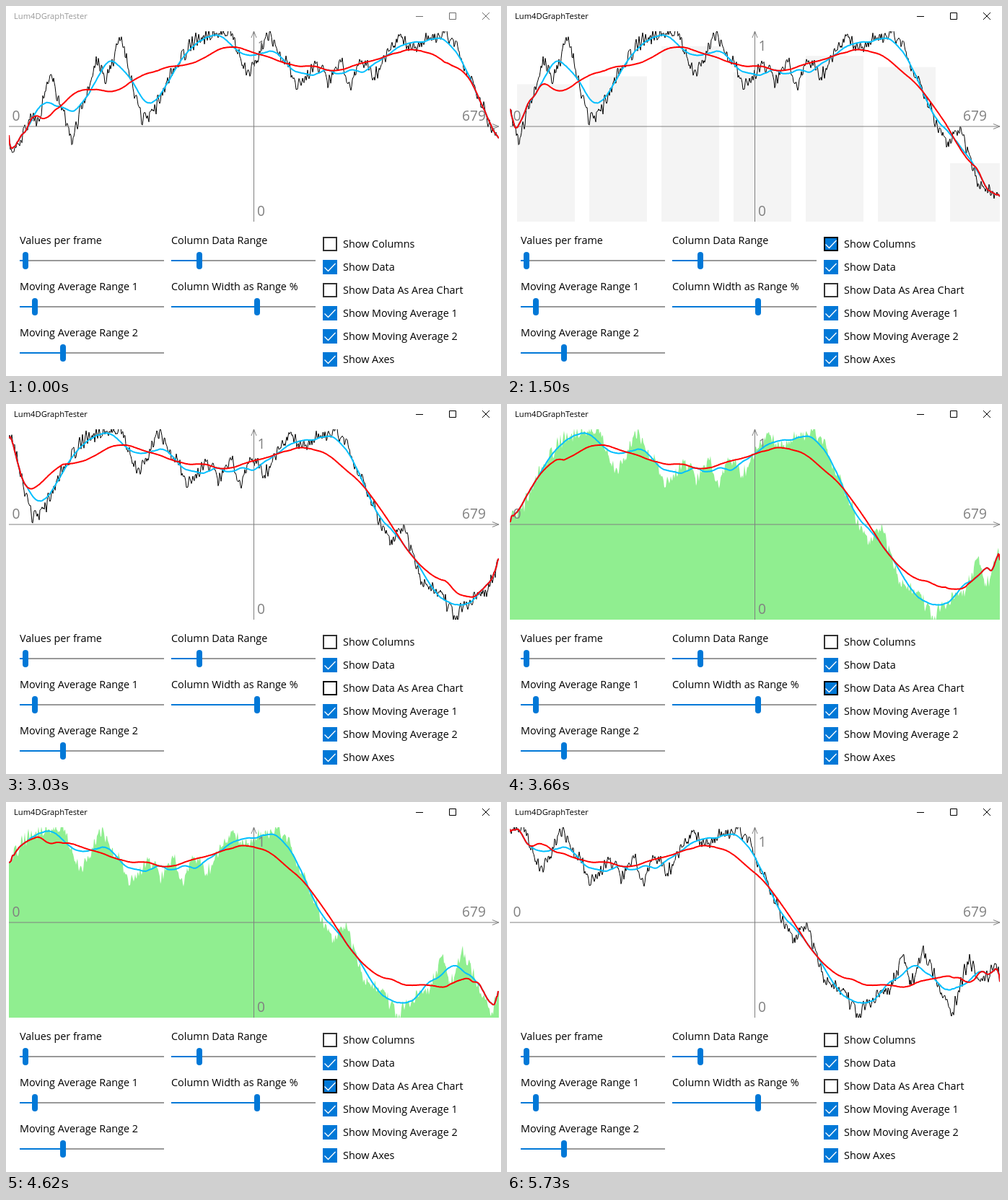
Write an HTML page that moves like this. It is 686 px wide and 513 px high and loops after 5850 ms.

```html
<!DOCTYPE html>
<html lang="en">
<head>
<meta charset="utf-8">
<title>Chart</title>
<style>
  html, body { margin: 0; width: 100%; height: 100%; overflow: hidden; background: #fff; }
  svg { display: block; width: 686px; height: 513px; }
  text { font-family: "Open Sans", "Noto Sans", sans-serif; font-size: 14.4px; fill: #000; }
  .line { fill: none; stroke-linejoin: round; }
  #axes path { fill: none; stroke: #808080; }
  #axes text { font-size: 19.2px; fill: #808080; }
  #caption text { font-size: 11.2px; fill: #999; }
  #caption path { fill: none; stroke: #6e6e6e; }
  #caption.active text { fill: #000; }
  #caption.active path { stroke: #000; }
  .box rect { fill: #fff; stroke: #333; stroke-width: 2; }
  .box path { fill: none; stroke: none; stroke-width: 1.3; }
  .box.on rect { fill: #0078d7; stroke: #0078d7; }
  .box.on path { stroke: #fff; }
  .box.hover rect { stroke: #000; }
</style>
</head>
<body>
<svg viewBox="0 0 686 513">
  <defs><clipPath id="plot"><rect x="4" y="35" width="679" height="264"/></clipPath></defs>
  <g id="caption">
    <text x="11" y="18">Lum4DGraphTester</text>
    <path d="M568 14.5h10M614.5 9.5h9v9h-9zM660 9l10 10M670 9l-10 10"/>
  </g>
  <g clip-path="url(#plot)">
    <path id="columns" fill="#f4f4f4"/>
    <path id="area" fill="#90ee90"/>
    <path id="data" class="line" stroke="#000"/>
    <g id="axes">
      <path d="M4 167H683M674 163.5L683 167L674 170.5M343.5 299V35M340 44L343.5 35L347 44"/>
      <text x="8.5" y="159">0</text>
      <text x="632" y="159">679</text>
      <text x="348.5" y="62">1</text>
      <text x="348" y="291">0</text>
    </g>
    <path id="average1" class="line" stroke="#00bfff" stroke-width="2"/>
    <path id="average2" class="line" stroke="#f00" stroke-width="2"/>
  </g>
  <g id="controls"></g>
</svg>
<script>
const LOOP = 5850, LAST = 5730, STEP = 30, SPEED = 0.0503;
const LEFT = 4, RIGHT = 683, BOTTOM = 299, COUNT = 680;
const $ = id => document.getElementById(id);

// Turning points of the signal; it runs straight between them, plus noise.
const turns = [
  [4, 187], [16, 198], [36, 150], [44, 162], [60, 92], [92, 186], [125, 78], [140, 102],
  [160, 44], [188, 157], [208, 140], [222, 104], [264, 44], [312, 35], [335, 98], [365, 38],
  [407, 114], [430, 80], [447, 104], [464, 76], [477, 116], [492, 74], [510, 98], [545, 44],
  [563, 57], [604, 35], [622, 52], [684, 194], [702, 170], [726, 242], [750, 257], [774, 297],
  [800, 268], [820, 258], [838, 212], [848, 256], [865, 205], [883, 250], [905, 290], [929, 214],
  [942, 258], [964, 228], [976, 252]
];

let seed = 41;
const random = () => (seed = (seed * 16807) % 2147483647) / 2147483647;

const signal = [];
let last = random();
for (let k = 1; k < turns.length; k++) {
  const [x0, y0] = turns[k - 1], [x1, y1] = turns[k];
  for (let x = x0; x < x1; x++) {
    const next = random();
    signal.push(y0 + (y1 - y0) * (x - x0) / (x1 - x0) + (last + next - 1) * 13);
    last = next;
  }
}
const sums = [0];
signal.forEach((y, n) => sums.push(sums[n] + y));
const mean = (from, to) => (sums[to] - sums[from]) / (to - from);

const trace = f => {
  let d = "";
  for (let i = 0; i < COUNT; i++) d += (i ? "L" : "M") + (LEFT + i) + " " + f(i).toFixed(1);
  return d;
};

// Centred mean whose window shrinks towards both ends of the view.
const average = (shift, half) => trace(i => {
  const r = Math.min(half, i, COUNT - 1 - i);
  return mean(shift + i - r, shift + i + r + 1);
});

const columns = shift => {
  let d = "";
  for (let i = 0; i < COUNT; i += 100) {
    const top = mean(shift + i, shift + Math.min(i + 100, COUNT));
    const x = LEFT + i + 10;
    d += `M${x} ${BOTTOM}V${top.toFixed(1)}H${Math.min(x + 80, RIGHT)}V${BOTTOM}z`;
  }
  return d;
};

const slider = (x, y, label, thumb) => `
  <text x="${x}" y="${y - 23}">${label}</text>
  <rect x="${x}" y="${y - 1}" width="200" height="2" fill="#999"/>
  <rect x="${x}" y="${y - 1}" width="${thumb - x}" height="2" fill="#0078d7"/>
  <rect x="${thumb - 4}" y="${y - 12}" width="8" height="24" rx="4" fill="#0078d7"/>`;

const checkbox = (label, row) => `
  <g class="box on" transform="translate(439 ${320 + 32 * row})">
    <rect x="1" y="1" width="18" height="18"/>
    <path d="M2.5 10.5L7.5 15.5L17.5 5"/>
    <text x="28" y="15">${label}</text>
  </g>`;

$("controls").innerHTML =
  slider(19, 353, "Values per frame", 27) +
  slider(19, 417, "Moving Average Range 1", 40) +
  slider(19, 481, "Moving Average Range 2", 79) +
  slider(229, 353, "Column Data Range", 268) +
  slider(229, 417, "Column Width as Range %", 348) +
  ["Show Columns", "Show Data", "Show Data As Area Chart", "Show Moving Average 1",
   "Show Moving Average 2", "Show Axes"].map(checkbox).join("");

const boxes = document.querySelectorAll(".box");
const within = (t, from, to) => t >= from && t < to;

function setBox(box, on, hover) {
  box.classList.toggle("on", on);
  box.classList.toggle("hover", hover);
}

function draw(time) {
  const t = Math.min(Math.floor(time / STEP) * STEP, LAST);
  const shift = Math.round(t * SPEED);
  const showColumns = within(t, 1230, 2640);
  const showArea = within(t, 3180, 5100);
  const line = trace(i => signal[shift + i]);

  $("caption").classList.toggle("active", t >= 1140);
  setBox(boxes[0], showColumns, within(t, 630, 2730));
  setBox(boxes[2], showArea, within(t, 2850, 5280));

  $("columns").setAttribute("d", showColumns ? columns(shift) : "");
  $("area").setAttribute("d", showArea ? `${line}V${BOTTOM}H${LEFT}z` : "");
  $("data").setAttribute("d", showArea ? "" : line);
  $("average1").setAttribute("d", average(shift, 25));
  $("average2").setAttribute("d", average(shift, 75));
}

const start = performance.now();
function tick() {
  draw((performance.now() - start) % LOOP);
  requestAnimationFrame(tick);
}
tick();
</script>
</body>
</html>
```
